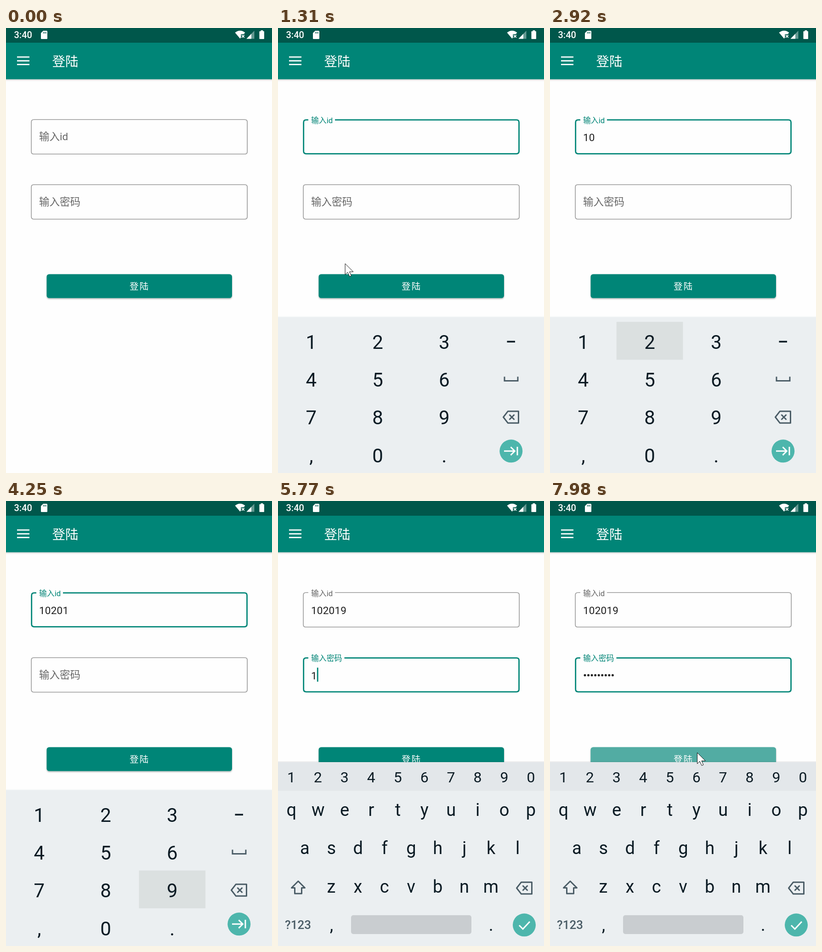
These frames come from a looping animation (579x968 px, 8 s). An HTML page:

```html
<!DOCTYPE html>
<html lang="zh">
<head>
<meta charset="utf-8">
<title>登陆</title>
<style>
  html, body { margin: 0; width: 100%; height: 100%; overflow: hidden; background: #fefefe; }
  svg { display: block; width: 100vw; height: 100vh; }
  text { font-family: Roboto, "Noto Sans CJK SC", "Noto Sans CJK", sans-serif; white-space: pre; }
  .key { fill: #0b1b24; text-anchor: middle; }
  .num { font-size: 42px; }
  .row { font-size: 32px; }
  .abc { font-size: 38px; }
  .value { font-size: 22.5px; letter-spacing: .2px; fill: #1f1f1f; }
  .icon { fill: none; stroke: #4a5c66; stroke-width: 3; }
  .go { fill: none; stroke: #fff; stroke-width: 3; }
  .outline { fill: none; }
</style>
</head>
<body>
<svg id="stage" viewBox="0 0 579 968" xmlns="http://www.w3.org/2000/svg">
  <defs>
    <linearGradient id="shade" x1="0" y1="0" x2="0" y2="1">
      <stop offset="0" stop-color="#000" stop-opacity=".17"/>
      <stop offset="1" stop-color="#000" stop-opacity="0"/>
    </linearGradient>
    <filter id="lift" x="-5%" y="-20%" width="110%" height="150%">
      <feDropShadow dx="0" dy="1.8" stdDeviation="1.4" flood-opacity=".3"/>
    </filter>
    <clipPath id="btnClip"><rect x="88.5" y="535.5" width="403.5" height="52" rx="5.5"/></clipPath>
    <g id="erase" class="icon" stroke-linejoin="round">
      <path d="M-6.5 -12.8H16.5V12.8H-6.5L-16.5 0Z"/>
      <path d="M-3.5 -5.5L7.5 5.5M7.5 -5.5L-3.5 5.5"/>
    </g>
  </defs>

  <rect width="579" height="968" fill="#fefefe"/>
  <rect y="111" width="579" height="5" fill="url(#shade)"/>
  <rect y="32" width="579" height="79.5" fill="#008577"/>
  <rect width="579" height="32" fill="#00574b"/>

  <g fill="#fff">
    <text x="17.5" y="22.3" font-size="20" font-weight="500">3:40</text>
    <path d="M81 6H88.500Q90 6 90 7.500V22.500Q90 24 88.500 24H77.500Q76 24 76 22.500V11Z"/>
    <path d="M498.500 10Q509.500 1.500 520.500 10L517.500 13.500H511.500V20.500L509.500 23Z"/>
    <path d="M513.200 15.200L518.800 20.800M518.800 15.200L513.200 20.800" stroke="#fff" stroke-width="1.8"/>
    <path d="M540.500 6V23.500H523.500Z" opacity=".4"/>
    <path d="M534 12.700V23.500H523.500Z"/>
    <path d="M554.500 5H559.500V7H561Q562 7 562 8V23Q562 24 561 24H552.500Q551.500 24 551.500 23V8Q551.500 7 552.500 7H554.500Z"/>
    <path d="M24 61.700H51V64.400H24ZM24 70H51V72.700H24ZM24 78H51V80.700H24Z"/>
    <text x="100.500" y="82.500" font-size="28.5">登陆</text>
  </g>
  <path d="M81.500 8.500V12M84.300 8.500V12M87 8.500V12" stroke="#00574b" stroke-width="1.3"/>

  <g id="fields"></g>

  <rect x="88.500" y="535.500" width="403.500" height="52" rx="5.5" fill="#008577" filter="url(#lift)"/>
  <circle id="ripple" cx="324" cy="549" fill="#fff" fill-opacity=".32" clip-path="url(#btnClip)"/>
  <text x="269" y="569" font-size="19.7" letter-spacing="1.76" fill="#fff">登陆</text>

  <g id="pad">
    <rect y="627" width="579" height="2" fill="#f6f8f9"/>
    <rect y="629" width="579" height="380" fill="#ebeff1"/>
    <rect id="hot" width="144.700" height="82.300" fill="#dbe0e0"/>
    <path d="M498.500 682.300H516" stroke="#0b1b24" stroke-width="3.600"/>
    <path class="icon" d="M493 758.500V767.500H522V758.500"/>
    <use href="#erase" x="507" y="846.500"/>
    <circle cx="507.300" cy="920.300" r="25" fill="#4db6ac"/>
    <path class="go" d="M492 920.300H515M506.500 911.500L515.300 920.300L506.500 929.100M521 911V929.500"/>
  </g>

  <g id="board">
    <rect y="566" width="579" height="2" fill="#000" opacity=".06"/>
    <rect y="568" width="579" height="400" fill="#ebeff1"/>
    <rect y="568" width="579" height="62.500" fill="#e3e7ea"/>
    <path class="icon" stroke-linejoin="round" d="M44 827L58.500 841.500H51.500V854H36.500V841.500H29.500Z"/>
    <use href="#erase" x="536" y="842"/>
    <text x="43.500" y="931" font-size="26" font-weight="500" text-anchor="middle" fill="#4a5c66">?123</text>
    <rect x="159" y="901" width="262" height="41" rx="5" fill="#c9cdd0"/>
    <circle cx="536" cy="922.300" r="25" fill="#4db6ac"/>
    <path class="go" d="M525 923L533 931L548 915"/>
  </g>

  <path id="mouse" d="M0.500 0.500V24.500L6 19.300L10.300 28.500L14 26.800L9.900 18.200H18.300Z"
        fill="#fff" stroke="#111" stroke-width="1"/>
</svg>

<script>
const LOOP = 8000, TEAL = '#008577', GREY = '#666';
const LEFT = 72, DIGIT = 12.85, DOT = 7.55;
const $ = id => document.getElementById(id);

function add(parent, tag, attrs, text) {
  const el = document.createElementNS('http://www.w3.org/2000/svg', tag);
  set(el, attrs);
  if (text) el.textContent = text;
  parent.append(el);
  return el;
}
function set(el, attrs) {
  for (const k in attrs) el.setAttribute(k, attrs[k]);
}
const show = (el, on) => el.setAttribute('visibility', on ? 'visible' : 'hidden');
const ramp = (t, from, to) => Math.min(1, Math.max(0, (t - from) / (to - from)));
const ease = p => p * p * (3 - 2 * p);
const mix = (a, b, p) => a + (b - a) * p;

// Last row of a table whose time has come
const at = (rows, t) => rows.filter(r => r[0] <= t).pop();

// Keyboards
function keys(parent, chars, x, step, y, cls) {
  [...chars].forEach((c, i) => add(parent, 'text', { x: x + step * i, y, class: 'key ' + cls }, c));
}
['123', '456', '789', ',0.'].forEach((r, i) => keys($('pad'), r, 72.4, 144.75, 698 + 82.2 * i, 'num'));
keys($('board'), '1234567890', 28.9, 57.95, 612.3, 'row');
keys($('board'), 'qwertyuiop', 29.3, 57.9, 685, 'abc');
keys($('board'), 'asdfghjkl', 58.3, 57.9, 768, 'abc');
keys($('board'), 'zxcvbnm', 116, 57.9, 852, 'abc');
keys($('board'), ',.', 116.5, 347.3, 935, 'abc');

// Text fields
function makeField(y, name, gapEnd) {
  const g = $('fields');
  return {
    y, gapEnd,
    line: add(g, 'path', { class: 'outline' }),
    label: add(g, 'text', { 'font-size': 22.5 }, name),
    value: add(g, 'text', { x: LEFT, y: y + 47.5, class: 'value' }),
    caret: add(g, 'rect', { y: y + 22.5, width: 2.8, height: 30.5, fill: TEAL })
  };
}
const idField = makeField(198.5, '输入id', 124);
const passField = makeField(340, '输入密码', 144.5);
const dots = Array.from({ length: 9 }, (_, i) =>
  add($('fields'), 'circle', { cx: 76 + DOT * i, cy: 379, r: 2.5, fill: '#1f1f1f' }));

function drawField(f, open, focus, float) {
  const w = focus ? 2.8 : 1.6, h = w / 2;
  const l = 54.3 + h, r = 526 - h, t = f.y + h, b = f.y + 76.5 - h, c = 5.5;
  const start = open ? f.gapEnd : 66;
  set(f.line, {
    d: `M${start} ${t}H${r - c}Q${r} ${t} ${r} ${t + c}V${b - c}Q${r} ${b} ${r - c} ${b}` +
       `H${l + c}Q${l} ${b} ${l} ${b - c}V${t + c}Q${l} ${t} ${l + c} ${t}H66`,
    stroke: focus ? TEAL : '#999', 'stroke-width': w
  });
  const y = f.y + mix(45.5, 8.3, float);
  set(f.label, {
    transform: `translate(${LEFT} ${y}) scale(${mix(1, .75, float)})`,
    fill: focus && float ? TEAL : GREY
  });
}

// [key, column, row, press, release]
const presses = [
  ['1', 0, 0, 1700, 1770], ['0', 1, 3, 2300, 2405], ['2', 1, 0, 2890, 3050],
  ['0', 1, 3, 3330, 3430], ['1', 0, 0, 3760, 3890], ['9', 2, 2, 4220, 4350]
];
const SECRET = '123456789', TYPE_AT = 5770, TYPE_STEP = 42, MASK_AT = 7450;

// Caret blinking, [time, on]
const blink = [
  [0, 0], [850, 1], [1250, 0], [1570, 1], [2090, 0], [2405, 1], [2750, 0], [3050, 1],
  [3380, 0], [3430, 1], [3760, 0], [3890, 1], [4220, 0], [4350, 1], [4680, 0], [4840, 1],
  [5160, 0], [5480, 1], [6430, 0], [6770, 1], [7090, 0], [7410, 1], [7730, 0]
];

// Pointer paths, [time, x, y]
const paths = [
  { end: 2890, pts: [
    [30, 457, 880], [180, 425, 720], [350, 350, 450], [500, 280, 295], [620, 240, 242],
    [1000, 240, 242], [1200, 190, 390], [1400, 110, 610], [1560, 82, 690],
    [1760, 82, 690], [1830, 140, 745], [2000, 190, 850], [2180, 210, 900]] },
  { end: LOOP, pts: [[6770, 451, 252], [6950, 442, 320], [7250, 385, 455], [7550, 320, 547]] }
];

function drawMouse(t) {
  const path = paths.find(p => t >= p.pts[0][0] && t < p.end);
  show($('mouse'), path);
  if (!path) return;
  const a = at(path.pts, t), b = path.pts[path.pts.indexOf(a) + 1] || a;
  const p = a === b ? 0 : ramp(t, a[0], b[0]);
  $('mouse').setAttribute('transform', `translate(${mix(a[1], b[1], p)} ${mix(a[2], b[2], p)})`);
}

function drawPad(t) {
  const p = ease(ramp(t, 1080, 1220));
  set($('pad'), { opacity: p, transform: `translate(0 ${34 * (1 - p)})` });
  show($('board'), t >= 4850);
  const hit = presses.find(k => t >= k[3] && t < k[4] + 60);
  set($('hot'), hit
    ? { x: hit[1] * 144.75, y: 639.3 + hit[2] * 82.2, opacity: 1 - ramp(t, hit[4], hit[4] + 60) }
    : { opacity: 0 });
}

function draw(t) {
  const inPass = t >= 4700;
  drawField(idField, t >= 850, t >= 850 && !inPass, ease(ramp(t, 975, 1100)));
  drawField(passField, inPass, inPass, ease(ramp(t, 4740, 4860)));

  const id = presses.filter(k => t >= k[4]).map(k => k[0]).join('');
  idField.value.textContent = id;

  const typed = t < TYPE_AT ? 0 : Math.min(9, 1 + Math.floor((t - TYPE_AT) / TYPE_STEP));
  const masked = t >= MASK_AT ? 9 : Math.max(0, typed - 1);
  dots.forEach((d, i) => show(d, i < masked));
  passField.value.textContent = typed > masked ? SECRET[typed - 1] : '';
  passField.value.setAttribute('x', LEFT + masked * DOT);

  const on = at(blink, t)[1];
  show(idField.caret, on && !inPass);
  show(passField.caret, on && inPass);
  idField.caret.setAttribute('x', LEFT + id.length * DIGIT);
  passField.caret.setAttribute('x', LEFT + masked * DOT + (typed - masked) * DIGIT);

  $('ripple').setAttribute('r', t < 7760 ? 0 : mix(20, 250, ramp(t, 7760, 7965)));
  drawPad(t);
  drawMouse(t);
}

function tick() {
  draw(performance.now() % LOOP);
  requestAnimationFrame(tick);
}
tick();
</script>
</body>
</html>
```
